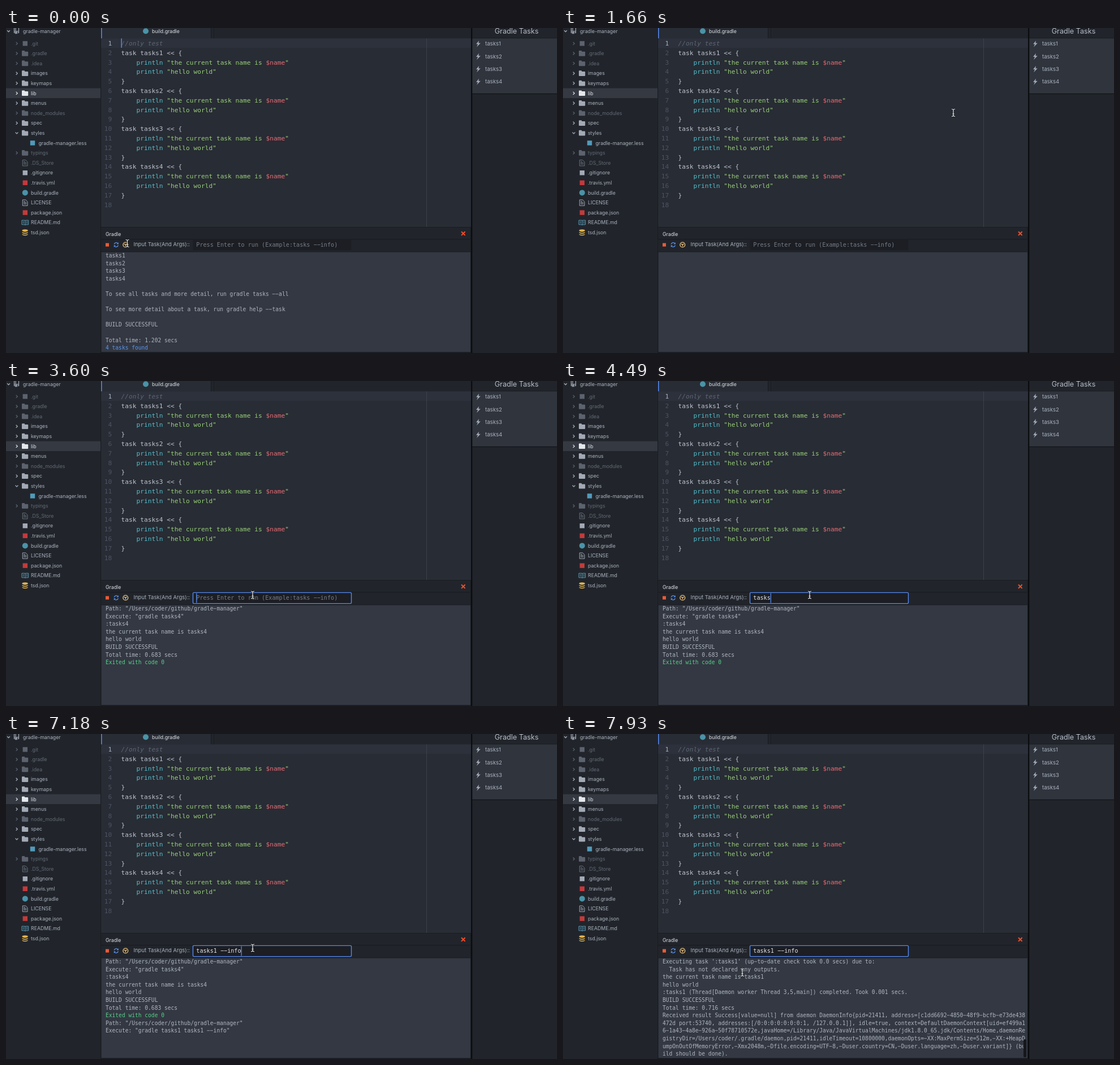
Animation of 974x575 px, one loop 8000 ms. Source, as an HTML page:

```html
<!DOCTYPE html>
<html lang="en">
<head>
<meta charset="utf-8">
<title>Gradle task panel</title>
<style>
html, body { margin: 0; width: 100%; height: 100%; overflow: hidden; background: #21252b; }
svg { display: block; width: 974px; height: 575px; }
text { white-space: pre; }
.ui { font-family: Inter, Roboto, sans-serif; font-size: 8.75px; fill: #abb2be; }
.code { font-family: "DejaVu Sans Mono", monospace; font-size: 11.2px; fill: #bcc2cd; }
.log { font-family: "DejaVu Sans Mono", monospace; font-size: 9.6px; fill: #b0b6c0; }
.field { font-family: "DejaVu Sans Mono", monospace; font-size: 10.13px; fill: #e2e5ea; }
.task { font-size: 9.6px; }
.head { font-size: 12.65px; fill: #b4bac5; }
.label { font-size: 9.45px; }
.light { fill: #dfe2e8; }
.dim { fill: #636a75; }
.num { fill: #4d5463; text-anchor: end; }
.num.on { fill: #abb2bf; }
.note { fill: #5f6672; font-style: italic; }
.fn { fill: #54bfcd; }
.str { fill: #98cf79; }
.var { fill: #e86b73; }
.ok { fill: #56cf88; }
.info { fill: #5b95ee; }
.hint { fill: #767c87; }
.line { fill: none; stroke-width: 1.1; }
</style>
</head>
<body>
<svg id="stage" viewBox="0 0 974 575"></svg>
<script>
const stage = document.getElementById('stage');
const NS = 'http://www.w3.org/2000/svg';

function el(tag, attrs, parent = stage) {
  const node = document.createElementNS(NS, tag);
  for (const key in attrs) node.setAttribute(key, attrs[key]);
  parent.appendChild(node);
  return node;
}
const rect = (x, y, width, height, fill, more) => el('rect', { x, y, width, height, fill, ...more });
const path = (d, fill, more) => el('path', { d, fill, ...more });
const stroke = (d, color, width = 1.1) => path(d, 'none', { stroke: color, 'stroke-width': width });
const dashes = s => s.replace(/-/g, '\u2212');
function text(x, y, str, cls) {
  const node = el('text', { x, y, class: cls });
  node.textContent = str;
  return node;
}
const show = (node, on) => node.setAttribute('visibility', on ? 'visible' : 'hidden');

// Sidebar
rect(0, 0, 168, 575, '#21252b');
rect(0, 106.5, 167, 17.5, '#343942');
const GREY = '#a3aab6', DIM = '#5c636e';
const chevron = (x, y, open, color) =>
  stroke(open ? `M${x - 2.4} ${y - 1.3}l2.4 2.6l2.4-2.6` : `M${x - 1.3} ${y - 2.5}l2.6 2.5l-2.6 2.5`, color, 1.3);

const icons = {
  folder: (y, c) => path(`M28 ${y - 4}q0-1 1-1h3.2q1 0 1 1v.7h5q1 0 1 1v6q0 1-1 1h-9.2q-1 0-1-1z`, c),
  doc: (y, c) => stroke(`M29.3 ${y - 5}h5.4l3.3 3.3v7h-8.7zM31 ${y - 2}h3M31 ${y}h5.3M31 ${y + 2.2}h5.3`, c, 1),
  square: (y, c, x = 33.8) => rect(x - 4.2, y - 4.2, 8.4, 8.4, c),
  circle: (y, c, x = 33.8) => el('circle', { cx: x, cy: y, r: 5, fill: c }),
  book: (y, c) => stroke(`M28 ${y - 4}h5q1 0 1 1q0-1 1-1h4.6v7.6h-4.6l-1 1l-1-1h-5zM34 ${y - 3}v7.6M29.7 ${y - 1.4}h2.5M29.7 ${y + .8}h2.5M35.7 ${y - 1.4}h2.5M35.7 ${y + .8}h2.5`, c, 1),
  data: (y, c) => {
    for (const dy of [-3, .3, 3.6])
      path(`M28.6 ${y + dy - 1}q5 2.6 10 0v1.3q-5 3.2-10 0z`, c);
    el('ellipse', { cx: 33.6, cy: y - 3.8, rx: 5, ry: 1.7, fill: c });
  }
};

chevron(4.5, 5.5, true, GREY);
stroke('M14.5 -2v10.5h2M20 8.5h2.5v-10M14.5 5.8h8M17 -1v6', GREY, 1.2);
path('M16.4 6.5h3v4.6l-1.5-1.3l-1.5 1.3z', GREY);
text(30, 9, 'gradle-manager', 'ui');

// name, icon, icon colour, style, tree state
const files = [
  ['.git', 'square', DIM, 'dim', 'closed'],
  ['.gradle', 'folder', DIM, 'dim', 'closed'],
  ['.idea', 'folder', DIM, 'dim', 'closed'],
  ['images', 'folder', GREY, '', 'closed'],
  ['keymaps', 'folder', GREY, '', 'closed'],
  ['lib', 'folder', '#e4e7ec', 'light', 'closed'],
  ['menus', 'folder', GREY, '', 'closed'],
  ['node_modules', 'folder', DIM, 'dim', 'closed'],
  ['spec', 'folder', GREY, '', 'closed'],
  ['styles', 'folder', GREY, '', 'open'],
  ['gradle-manager.less', 'square', '#519aba', '', 'child'],
  ['typings', 'folder', DIM, 'dim', 'closed'],
  ['.DS_Store', 'doc', '#6b727d', 'dim'],
  ['.gitignore', 'square', GREY],
  ['.travis.yml', 'square', '#c5383c'],
  ['build.gradle', 'circle', '#4a93a8'],
  ['LICENSE', 'doc', GREY],
  ['package.json', 'square', '#c23b3b'],
  ['README.md', 'book', '#5d9fbb'],
  ['tsd.json', 'data', '#e2b44f']
];
files.forEach(([name, icon, color, cls = '', tree], i) => {
  const y = 27.4 + 17.6 * i, child = tree === 'child';
  if (tree === 'open' || tree === 'closed') chevron(19, y, tree === 'open', color);
  icons[icon](y, color, child ? 47 : 33.8);
  text(child ? 57.5 : 44, y + 3.2, name, 'ui ' + cls);
});

// Editor
rect(168, 0, 654, 353, '#282c34');
rect(363, 0, 459, 18.5, '#21252b');
rect(362, 0, 1, 18.5, '#181a1f');
rect(367, 0, 1, 18.5, '#191c21');
rect(167.3, 0, .8, 575, '#181a1f');
rect(168, 0, 1.6, 18.5, '#568af2');
icons.circle(5.5, '#4a93a8', 247);
text(258, 8.6, 'build.gradle', 'ui light');
rect(168, 18.5, 654, 16.5, '#2c313c');
rect(743, 18.5, 1, 334, '#3c414a');

const rowY = n => 30.9 + 16.8 * n;
function codeLine(n, parts) {
  const node = text(203.5, rowY(n), '', 'code');
  for (const [str, cls] of parts) el('tspan', { class: cls }, node).textContent = str;
}
for (let n = 0; n < 18; n++) text(187.3, rowY(n), n + 1, 'code num' + (n ? '' : ' on'));
codeLine(0, [['//only test', 'note']]);
for (let k = 0; k < 4; k++) {
  const n = 1 + 4 * k;
  codeLine(n, [[`task tasks${k + 1} << {`, '']]);
  codeLine(n + 1, [['    println', 'fn'], [' "the current task name is ', 'str'], ['$name', 'var'], ['"', 'str']]);
  codeLine(n + 2, [['    println', 'fn'], [' "hello world"', 'str']]);
  codeLine(n + 3, [['}', '']]);
}
const editCaret = rect(203.4, 18.5, 1.5, 16.5, '#568af2');

// Bottom panel
rect(168, 352, 654, 223, '#21252b');
rect(168, 352, 654, 1, '#181a1f');
rect(168, 373.3, 654, 1, '#181a1f');
text(176, 367.6, 'Gradle', 'ui light');
stroke('M805 360.3l6.6 6.6M811.6 360.3l-6.6 6.6', '#f0502f', 2);
rect(176, 380.6, 6, 6, '#ee5a35');
stroke('M191.2 382.6a3.7 3.7 0 0 1 6.6-1.4M198.3 384.4a3.7 3.7 0 0 1-6.6 1.4', '#5a93ee', 1.3);
path('M198.8 379.2v3.3h-3.3zM190.7 387.8v-3.3h3.3z', '#5a93ee');
const runIcon = el('g', { fill: 'none', 'stroke-width': 1.4 });
el('circle', { cx: 211.3, cy: 383.5, r: 4.4 }, runIcon);
el('path', { d: 'M208.8 381.8l2.6 1.8l2.4-1.8M211.4 383.6v2.6' }, runIcon);
text(225.5, 386.4, 'Input Task(And Args)::', 'ui label');
const box = rect(330.5, 374.4, 280, 19.2, '#1c1e24', { rx: 1.5 });
const field = text(336.3, 387, '', 'field');
const fieldCaret = rect(336, 375.5, 1.3, 17, '#568af2');

rect(168, 395.6, 654, 179.4, '#181a1f');
rect(168.5, 396.5, 652.5, 176.8, '#333842');
rect(821, 353, 1.2, 222, '#191c21');
const logRows = Array.from({ length: 13 }, (_, k) => text(176, 406 + 13.6 * k, '', 'log'));
const thumb = rect(814, 540, 5, 32, '#15171b', { rx: 2.5 });

// Task list
rect(822, 0, 2.6, 575, '#0c0d10');
rect(824.5, 0, 149.5, 575, '#21252b');
text(863.7, 10, 'Gradle Tasks', 'ui head');
rect(824.5, 17.5, 149.5, 1, '#181a1f');
rect(824.5, 18.5, 149.5, 97.5, '#2f343d');
rect(824.5, 115.8, 149.5, 1.2, '#0f1114');
const hover = rect(825, 85, 149, 20, '#3a404b');
const tasks = [1, 2, 3, 4].map(n => {
  const y = 28 + 22.35 * (n - 1);
  const bolt = path(`M836 ${y - 5.6}l-5 6.2h3.2l-2.2 5.2l6.8-7h-3.5z`, GREY);
  return { bolt, name: text(847, y + 3.4, 'tasks' + n, 'ui task') };
});

// Mouse
const beam = el('g', {});
for (const [color, width] of [['#15171b', 2.6], ['#f4f5f7', 1.2]])
  el('path', { d: 'M-3-6.5q2.6 0 3 1.6q.4-1.6 3-1.6M0-5v10M-3 6.5q2.6 0 3-1.6q.4 1.6 3 1.6M-1.5 2h3',
    fill: 'none', stroke: color, 'stroke-width': width }, beam);
const arrow = el('g', {});
el('path', { d: 'M0 0v11.3l2.6-2.4l1.8 4.2l2-.9l-1.8-4h3.7z', fill: '#050506', stroke: '#fff', 'stroke-width': 1 }, arrow);

// Timeline
const home = 'Path: "/Users/coder/github/gradle-manager"';
const start4 = [home, 'Execute: "gradle tasks4"'];
const done4 = [...start4, ':tasks4', 'the current task name is tasks4', 'hello world',
  'BUILD SUCCESSFUL', 'Total time: 0.683 secs', '+Exited with code 0'];
const start1 = [...done4, home, 'Execute: "gradle tasks1 tasks1 --info"'];
const ran1 = [...start1,
  "Executing task ':tasks1' (up-to-date check took 0.0 secs) due to:",
  '  Task has not declared any outputs.',
  'the current task name is tasks1',
  'hello world',
  ':tasks1 (Thread[Daemon worker Thread 3,5,main]) completed. Took 0.001 secs.',
  'BUILD SUCCESSFUL',
  'Total time: 0.716 secs'];
const done1 = [...ran1,
  'Received result Success[value=null] from daemon DaemonInfo{pid=21411, address=[c1dd6692-4850-48f9-bcfb-e73de438',
  '472d port:53740, addresses:[/0:0:0:0:0:0:0:1, /127.0.0.1]], idle=true, context=DefaultDaemonContext[uid=ef499a1',
  '6-1a43-4a8e-926a-50f78710572e,javaHome=/Library/Java/JavaVirtualMachines/jdk1.8.0_65.jdk/Contents/Home,daemonRe',
  'gistryDir=/Users/coder/.gradle/daemon,pid=21411,idleTimeout=10800000,daemonOpts=-XX:MaxPermSize=512m,-XX:+HeapD',
  'umpOnOutOfMemoryError,-Xmx2048m,-Dfile.encoding=UTF-8,-Duser.country=CN,-Duser.language=zh,-Duser.variant]} (bu',
  'ild should be done).'];
const listed = ['tasks1', 'tasks2', 'tasks3', 'tasks4', '', 'To see all tasks and more detail, run gradle tasks --all', '',
  'To see more detail about a task, run gradle help --task', '', 'BUILD SUCCESSFUL', '',
  'Total time: 1.202 secs', '*4 tasks found'];

const logs = [[0, listed], [620, []], [1960, start4], [2860, done4.slice(0, 5)], [3010, done4],
  [6880, start1], [7630, ran1], [7780, done1]];
const mouse = [[0, 214.5, 381, beam], [470, 215, 381, arrow], [1070, 238, 369, arrow], [1220, 330, 322, beam],
  [1370, 500, 236, beam], [1520, 690, 150, beam], [1670, 812, 104, beam], [1810, 858, 92, arrow],
  [2710, 494, 309, beam], [2860, 456, 350, beam], [3010, 439, 374, beam], [3160, 436, 378.5, beam],
  [7480, 430, 383, beam], [7630, 380, 405, beam], [7780, 330, 420, beam], [7930, 317, 422, beam]];
const typed = 'tasks1 --info';
const keys = [3890, 4040, 4190, 4340, 4490, 4940, 5240, 5540, 5690, 5840, 5990, 6130, 6280];

const at = (list, t) => list.filter(item => item[0] <= t).pop();
const within = (t, ...spans) => spans.some(([a, b]) => t >= a && t < b);
let shown;

function drawLog(lines) {
  if (shown === lines) return;
  shown = lines;
  const tail = lines.slice(-13);
  logRows.forEach((row, i) => {
    const line = tail[i] || '', mark = line[0];
    const cls = mark === '+' ? 'ok' : mark === '*' ? 'info' : '';
    row.setAttribute('class', 'log ' + cls);
    row.textContent = dashes(cls ? line.slice(1) : line);
  });
}

function render(t) {
  drawLog(at(logs, t)[1]);
  show(thumb, t >= 7630);

  const focus = t >= 3310;
  show(editCaret, !focus && !within(t, [150, 620], [1220, 1670], [2260, 2710], [3160, 3310]));
  const count = keys.filter(k => k <= t).length;
  field.textContent = dashes(count ? typed.slice(0, count) : 'Press Enter to run (Example:tasks --info)');
  field.setAttribute('class', count ? 'field' : 'field hint');
  box.setAttribute('stroke', focus ? '#568af2' : 'none');
  box.setAttribute('stroke-width', 1.4);
  fieldCaret.setAttribute('x', 336.2 + count * 6.1);
  show(fieldCaret, focus && !within(t, [6880, 7180], [7780, 8000]));

  runIcon.setAttribute('stroke', within(t, [620, 1070]) ? '#e08b2c' : '#e6bd78');
  const over = within(t, [1810, 2860]);
  show(hover, over);
  tasks[3].name.setAttribute('class', over ? 'ui task light' : 'ui task');
  tasks[3].bolt.setAttribute('fill', over ? '#e4e7ec' : GREY);

  const [, x, y, shape] = at(mouse, t);
  show(beam, shape === beam);
  show(arrow, shape === arrow);
  shape.setAttribute('transform', `translate(${x} ${y})`);
}

const begin = performance.now();
function tick() {
  render((performance.now() - begin) % 8000);
  requestAnimationFrame(tick);
}
tick();
</script>
</body>
</html>
```
